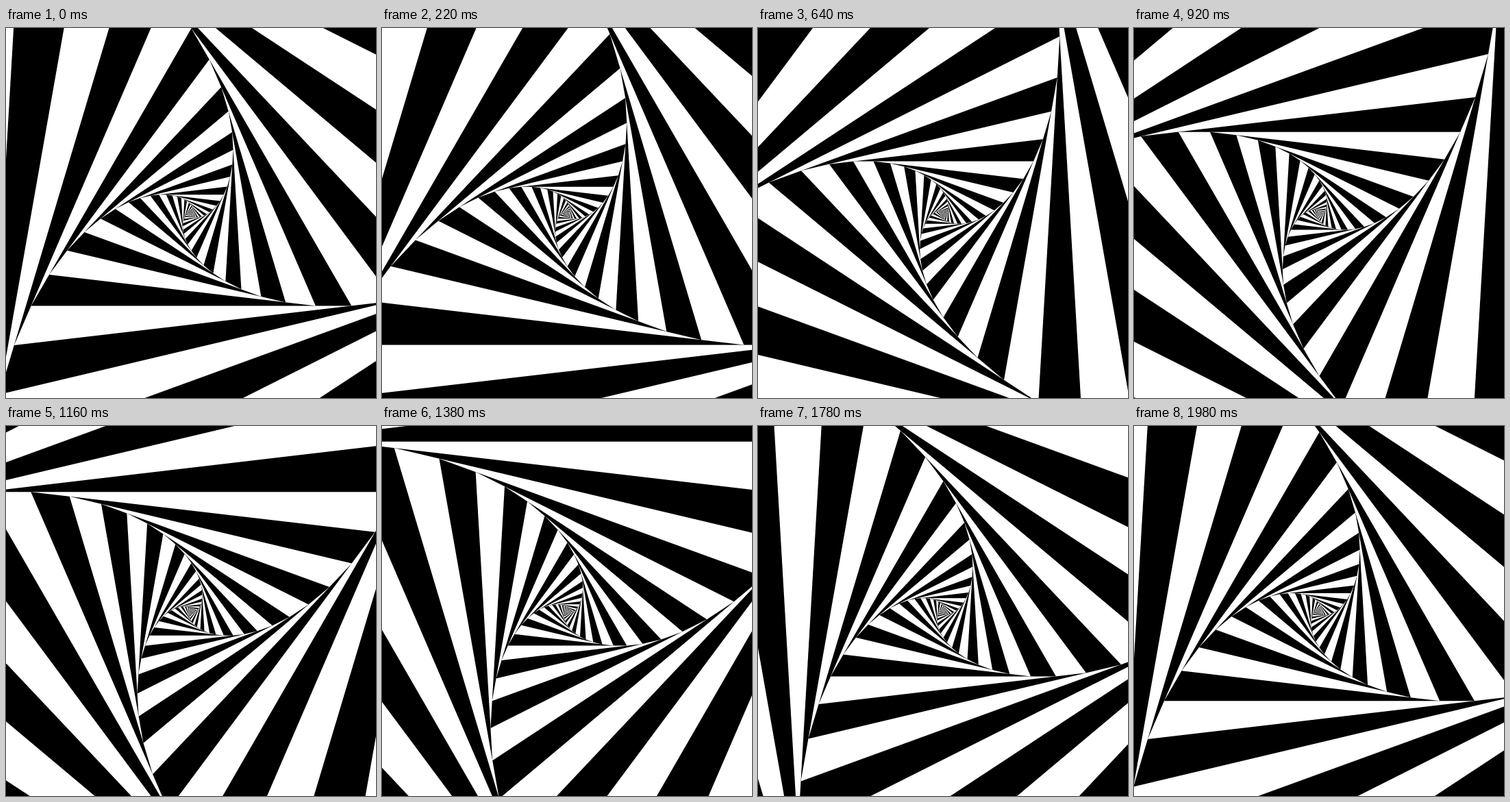
Write an HTML page with a canvas that moves like this. It is 540 px wide and 540 px high and loops after 2 s.

```html
<!DOCTYPE html>
<html lang="en">
<head>
<meta charset="utf-8">
<title>Triangle spiral</title>
<style>
  html, body { margin: 0; width: 100%; height: 100%; overflow: hidden; background: #000; }
  canvas { display: block; }
</style>
</head>
<body>
<canvas id="stage" width="540" height="540"></canvas>
<script>
const ctx = document.getElementById('stage').getContext('2d');
const LOOP = 2000, TICK = 20, RADIUS = 270;
const CENTER = 270.5;                    // the middle of a pixel
const STEPS = 18;                        // nested triangles per third of a turn
const TURN = 2 * Math.PI / 3;
const TWIST = TURN / STEPS;
// Each triangle's corners touch the sides of the one around it.
const SHRINK = 0.5 / Math.cos(Math.PI / 3 - TWIST);

function triangle(radius, angle) {
  ctx.beginPath();
  for (let i = 0; i < 3; i++) {
    const a = angle + i * TURN;
    ctx.lineTo(CENTER + radius * Math.cos(a), CENTER + radius * Math.sin(a));
  }
  ctx.fill();
}

function draw(progress) {
  // One loop zooms in by exactly STEPS triangles.
  const zoom = RADIUS * SHRINK ** (-STEPS * progress);
  ctx.fillStyle = '#000';
  ctx.fillRect(0, 0, 540, 540);
  for (let n = -8 + Math.floor(STEPS * progress); ; n++) {
    const radius = zoom * SHRINK ** n;
    if (radius < 0.5) break;
    ctx.fillStyle = n % 2 ? '#fff' : '#000';
    triangle(radius, n * TWIST - Math.PI / 2);
  }
}

function frame() {
  const t = performance.now() % LOOP;
  draw(Math.floor(t / TICK) * TICK / LOOP);
  requestAnimationFrame(frame);
}
frame();
</script>
</body>
</html>
```
